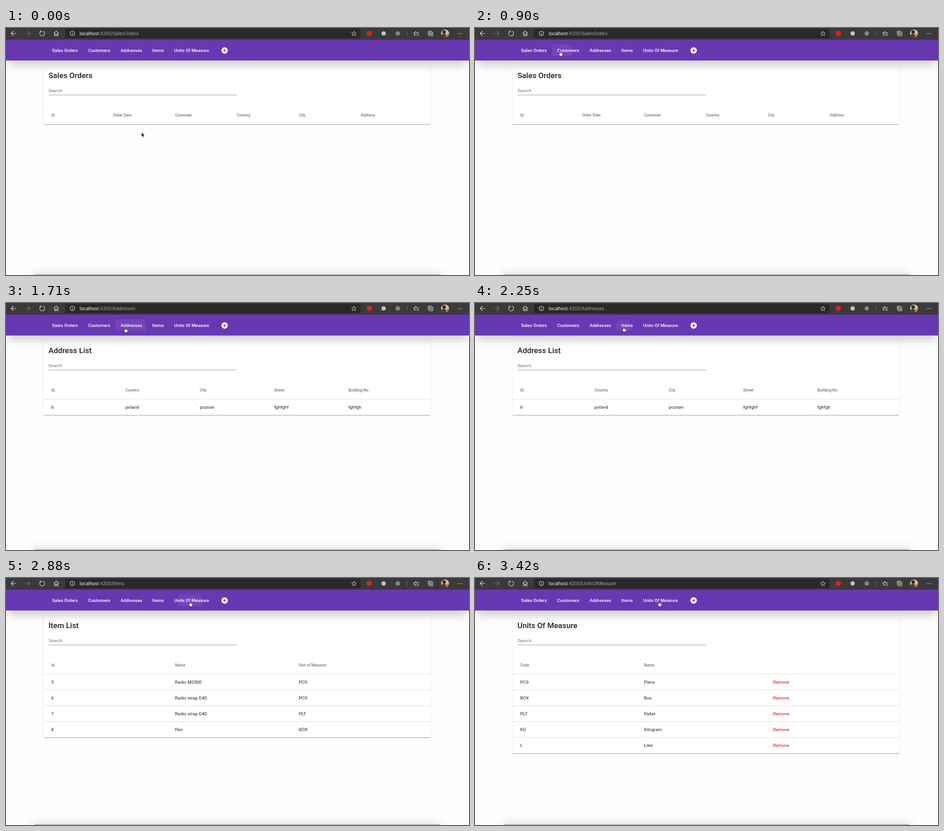
An HTML page that plays this animation: 1025x547 px, repeating every 3.6 s.

```html
<!DOCTYPE html>
<html lang="en">
<head>
<meta charset="utf-8">
<title>Order manager</title>
<style>
  html, body { margin: 0; width: 100%; height: 100%; overflow: hidden; background: #fefefe; }
  svg { display: block; width: 100%; height: 100%; }
  text { font: 400 9.97px Roboto, sans-serif; fill: #212121; white-space: pre; }
  .nav text { font-weight: 500; fill: #fff; }
  .title { font-size: 17.1px; font-weight: 500; }
  .label { fill: #757575; }
  .head { font-size: 8.54px; font-weight: 500; fill: #757575; }
  .remove { font-weight: 500; fill: #e0392b; }
  .url { font: 400 9.9px Inter, sans-serif; fill: #a9a9a9; }
  .url .host { fill: #fff; }
  .icon { fill: none; stroke: #e6e6e6; stroke-width: 1.1; stroke-linecap: round; stroke-linejoin: round; }
</style>
</head>
<body>
<svg viewBox="0 0 1025 547" preserveAspectRatio="none">
  <defs>
    <filter id="raised" filterUnits="userSpaceOnUse" x="70" y="70" width="890" height="340">
      <feDropShadow dx="0" dy=".9" stdDeviation=".6" flood-opacity=".36"/>
      <feDropShadow dx="0" dy=".7" stdDeviation="1.6" flood-opacity=".1"/>
    </filter>
    <filter id="soft" filterUnits="userSpaceOnUse" x="-60" y="0" width="1150" height="640">
      <feGaussianBlur stdDeviation="11"/>
    </filter>
    <clipPath id="buttonClip"><rect id="button" y="36.3" height="25.6" rx="2.8"/></clipPath>
    <clipPath id="avatar"><circle cx="972" cy="12" r="8.8"/></clipPath>
  </defs>

  <rect width="1025" height="547" fill="#fefefe"/>
  <rect x="60" y="545" width="904" height="80" fill="#000" opacity=".17" filter="url(#soft)"/>
  <path d="M64 546.5H961" stroke="#8c8c8c"/>

  <rect x="82.7" y="84" width="857" height="88" rx="2.8" fill="#fff" filter="url(#raised)"/>
  <rect id="table" x="82.7" y="172" width="857" rx="2.8" fill="#fff" filter="url(#raised)"/>
  <rect x="4" y="34" width="1017" height="48" fill="#000" opacity=".2" filter="url(#soft)"/>
  <text id="title" class="title" x="94" y="110.8"/>
  <text class="label" x="94" y="142.4">Search</text>
  <path d="M94 148.3H511" stroke="#8f8f8f" stroke-width=".9"/>
  <g id="cells"></g>

  <rect y="25" width="1025" height="47" fill="#6838b3"/>
  <g clip-path="url(#buttonClip)"><circle id="ripple" fill="#fff"/></g>
  <g class="nav">
    <text x="102" y="53">Sales Orders</text>
    <text x="182" y="53">Customers</text>
    <text x="253.7" y="53">Addresses</text>
    <text x="324" y="53">Items</text>
    <text x="372.2" y="53">Units Of Measure</text>
  </g>
  <circle cx="484" cy="49.8" r="7.1" fill="#fff"/>
  <path d="M480.4 49.8h7.2M484 46.2v7.2" stroke="#6838b3" stroke-width="1.5"/>

  <rect width="1025" height="25.8" fill="#3a3a3a"/>
  <rect x="131" y="1.5" width="654" height="21.5" rx="3" fill="#292929"/>
  <g class="icon">
    <path d="M22.5 12H11.5M16.5 7l-5 5 5 5"/>
    <path d="M42.5 12h11M48.5 7l5 5-5 5" stroke="#777"/>
    <path d="M76.6 7.7A5.5 5.5 0 1 0 82 6.9M76.2 5.8v2.6h2.8"/>
    <path d="M106.3 11.5l5-4.8 5 4.8M107.5 10.8v6.4h2.4v-3.6h2.8v3.6h2.4v-6.4"/>
    <circle cx="147" cy="12" r="5"/>
    <path d="M147 11.6v3M147 9.4v.1"/>
    <path id="star" stroke="#bbb"/>
    <path d="M888.5 8v9" stroke="#6a6a6a"/>
    <path d="M910 10.4l-1.4-.2-1.5-2.8-1.5 2.8-3.2.5 2.3 2.3-.5 3.3 2.9-1.5M910.5 10.3h3.3M909.5 13.2h4.3M909.5 16.2h4.3"/>
    <path d="M937.2 9.2h7.6v8h-7.6zM935 14.4V7h7.2M941 11.2v4M939 13.2h4"/>
  </g>
  <circle cx="804.3" cy="12" r="6" fill="#d8261c"/>
  <circle cx="836" cy="12" r="4.8" fill="#c4c4c4"/>
  <circle cx="867.3" cy="12" r="5" fill="#858585"/>
  <g clip-path="url(#avatar)">
    <rect x="963" y="3" width="18" height="18" fill="#d9c0a2"/>
    <circle cx="970" cy="9" r="4" fill="#3b2c25"/>
    <ellipse cx="969" cy="19" rx="6" ry="6" fill="#4d3a30"/>
    <circle cx="978" cy="17" r="4" fill="#b5835a"/>
  </g>
  <g fill="#e6e6e6"><circle cx="1001" cy="12.4" r=".9"/><circle cx="1005" cy="12.4" r=".9"/><circle cx="1009" cy="12.4" r=".9"/></g>
  <text class="url" x="163" y="15.8"><tspan class="host">localhost</tspan>:4200/<tspan id="path"/></text>

  <g id="cursor">
    <path id="arrow" d="M0 0V10.2L2.4 8 4.1 11.8 5.8 11 4.2 7.4H7.4Z" fill="#111" stroke="#fff" stroke-width=".8"/>
    <path id="hand" d="M-1 .8C-1-.3.8-.3.9.8V4.2C1.3 3.6 2.5 3.7 2.7 4.6 3.3 4 4.3 4.2 4.5 5.1 5.2 4.7 6 5.1 6 6V8.2C6 9.6 5.2 10 5 11.6H-.1C-.4 9.9-2.3 8.5-3.2 6.9-3.7 5.8-2.5 5.3-1.8 6L-1 7Z" fill="#fff" stroke="#111" stroke-width=".9" stroke-linejoin="round"/>
  </g>
</svg>
<script>
const LOOP = 3600, STEP = 90;
const ROW = 35, HEAD_BOTTOM = 213, TABLE_WIDTH = 822.4;
const $ = id => document.getElementById(id);
const set = (el, attrs) => { for (const k in attrs) el.setAttribute(k, attrs[k]); };

const pages = [
  { at: 0, path: 'SalesOrders', title: 'Sales Orders',
    cols: ['Id.', 'Order Date', 'Customer', 'Country', 'City', 'Address'], rows: [] },
  { at: 990, path: 'Customers', title: 'Customer List', cols: ['Id.', 'Name'],
    rows: [['1', 'Old Quendals Furniture'], ['2', 'Vrenmola Devices Ltd.'], ['3', 'Tronvakit']] },
  { at: 1710, path: 'Addresses', title: 'Address List',
    cols: ['Id.', 'Country', 'City', 'Street', 'Building No.'],
    rows: [['6', 'poland', 'poznan', 'fghfghf', 'fghfgh']] },
  { at: 2340, path: 'Items', title: 'Item List', cols: ['Id.', 'Name', 'Unit of Measure'],
    rows: [['5', 'Radio M2500', 'PCS'], ['6', 'Radio strap D40', 'PCS'],
           ['7', 'Radio strap D40', 'PLT'], ['8', 'Pen', 'BOX']] },
  { at: 2970, path: 'UnitsOfMeasure', title: 'Units Of Measure', cols: ['Code', 'Name', ''],
    rows: [['PCS', 'Piece'], ['BOX', 'Box'], ['PLT', 'Pallet'], ['KG', 'Kilogram'], ['L', 'Liter']]
      .map(r => [...r, 'Remove']) }
];

// Button extents and the moment each is pressed
const clicks = [
  { at: 855, x: 170.8, w: 71.5 },
  { at: 1575, x: 242.3, w: 70.3 },
  { at: 2205, x: 312.6, w: 48.2 },
  { at: 2835, x: 360.8, w: 100.6 }
];

// Pointer stops: time, x, y
const stops = [
  [180, 300, 231], [630, 181, 47], [810, 188, 50.8], [1080, 188, 50.8],
  [1350, 254.5, 57], [1530, 263.5, 54], [1800, 263.5, 54],
  [2160, 328.5, 52.5], [2340, 328.5, 52.5], [2700, 407, 51.5]
];

function pointer(t) {
  const i = stops.findIndex(s => s[0] > t);
  if (i < 0) return stops[stops.length - 1].slice(1);
  if (i === 0) return stops[0].slice(1);
  const [t0, x0, y0] = stops[i - 1], [t1, x1, y1] = stops[i];
  const u = (t - t0) / (t1 - t0), e = u * u * (3 - 2 * u);
  return [x0 + (x1 - x0) * e, y0 + (y1 - y0) * e];
}

// cubic-bezier(0, 0, .2, 1), solved by bisection
function decelerate(x) {
  let lo = 0, hi = 1;
  for (let i = 0; i < 20; i++) {
    const s = (lo + hi) / 2;
    if (.6 * s * s * (1 - s) + s ** 3 < x) lo = s; else hi = s;
  }
  return 3 * lo * lo * (1 - lo) + lo ** 3;
}

let shown;
function showPage(page) {
  if (page === shown) return;
  shown = page;
  const { cols, rows } = page;
  const left = i => 100 + i * TABLE_WIDTH / cols.length;
  const cell = (text, x, y, cls = '') => `<text class="${cls}" x="${x}" y="${y}">${text}</text>`;
  let out = cols.map((c, i) => cell(c, left(i), 195.8, 'head')).join('');
  rows.forEach((row, r) => {
    const top = HEAD_BOTTOM + r * ROW;
    out += `<path d="M82.7 ${top}H939.7" stroke="#dcdcdc"/>`;
    out += row.map((c, i) => c === 'Remove'
      ? cell(c, left(i) + 11.4, top + 21.4, 'remove')
      : cell(c, left(i), top + 21.4)).join('');
  });
  $('cells').innerHTML = out;
  $('title').textContent = page.title;
  $('path').textContent = page.path;
  set($('table'), { height: HEAD_BOTTOM + rows.length * ROW - 172 });
}

function showRipple(t) {
  const ENTER = 225, FADE = 200;
  const hit = clicks.find(c => t > c.at && t < c.at + ENTER + FADE);
  if (!hit) return set($('ripple'), { r: 0 });
  const age = t - hit.at, [cx, cy] = pointer(hit.at);
  const reach = Math.hypot(Math.max(cx - hit.x, hit.x + hit.w - cx), Math.max(cy - 36.3, 61.9 - cy));
  set($('button'), { x: hit.x, width: hit.w });
  set($('ripple'), {
    cx, cy,
    r: reach * decelerate(Math.min(1, age / ENTER)),
    opacity: .065 * (1 - Math.max(0, age - ENTER) / FADE)
  });
}

function draw(ms) {
  const t = Math.floor(ms % LOOP / STEP) * STEP;
  showPage(pages.filter(p => p.at <= t).pop());
  showRipple(t);
  const [x, y] = pointer(t), over = y < 62;
  set($('cursor'), { transform: `translate(${x} ${y})` });
  set($('hand'), { visibility: over ? 'visible' : 'hidden' });
  set($('arrow'), { visibility: over ? 'hidden' : 'visible' });
}

const points = Array.from({ length: 10 }, (_, i) => {
  const a = i * Math.PI / 5 - Math.PI / 2, r = i % 2 ? 2.5 : 5.4;
  return `${770.3 + r * Math.cos(a)} ${12.6 + r * Math.sin(a)}`;
});
set($('star'), { d: `M${points.join('L')}Z` });

const start = performance.now();
function tick() {
  draw(performance.now() - start);
  requestAnimationFrame(tick);
}
tick();
</script>
</body>
</html>
```
